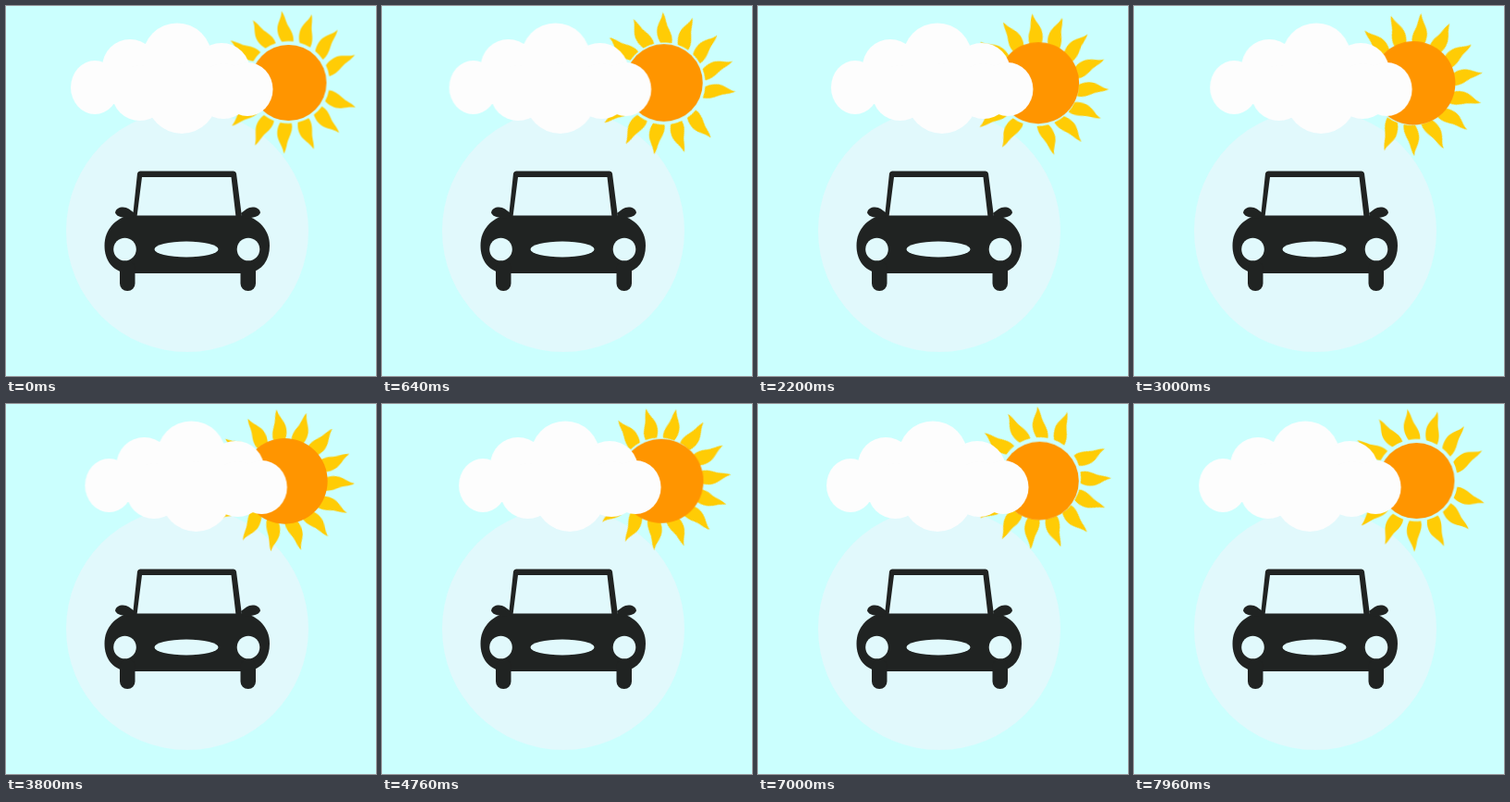
Animation of 400x400 px, one loop 8000 ms. Source, as an HTML page without scripts:

```html
<!DOCTYPE html>
<html lang="en">
<head>
<meta charset="utf-8">
<title>Car under a sunny sky</title>
<style>
  html, body { margin: 0; width: 100%; height: 100%; overflow: hidden; background: #cbfffe; }
  svg { display: block; width: 100%; height: 100%; }

  .cloud { fill: #fdfdfd; animation: drift 4s linear infinite alternate; }
  .disc { fill: #ff9500; animation: swell 4s linear infinite alternate; }
  .rays { fill: #ffcc05; animation: turn 8s linear infinite; }

  /* --i counts from the middle of the ring, --m flips the hook */
  .rays use {
    transform: rotate(calc(181.2deg + 24.9deg * var(--i))) translate(44px, 0)
      skewY(calc(-5deg - 1.2deg * var(--i))) scale(1, var(--m));
  }
  .left { --m: -1; }
  .right { --m: 1; }

  .pale { fill: #e1f9fc; }
  .car { fill: #202322; }

  @keyframes drift { to { transform: translateX(16.2px); } }
  @keyframes swell {
    from { transform: translate(305.5px, 83px) scale(41); }
    to { transform: translate(301.1px, 83.4px) scale(46.6); }
  }
  @keyframes turn {
    from { transform: translate(302.5px, 82.5px) rotate(0deg); }
    to { transform: translate(302.5px, 82.5px) rotate(360deg); }
  }
</style>
</head>
<body>
<svg viewBox="0 0 400 400">
  <defs>
    <path id="ray" d="M0-6C6-9 13-9.500 19-6.500S27-1.500 33.300 0C27 3 22 2 16 4.500S5 8 0 6.500Q1 0 0-6Z"/>
    <g id="side">
      <path d="M118 223.500C119 217 128 216 133 219.500L139 224 137 229C130 229.500 120 229 118 223.500Z"/>
      <rect x="123" y="276" width="16.500" height="32" rx="8"/>
    </g>
  </defs>

  <circle class="pale" cx="196" cy="243" r="131"/>

  <g class="rays">
    <g transform="translate(3 0)">
      <g class="left">
        <use href="#ray" style="--i:-6.5"/>
        <use href="#ray" style="--i:-5.5"/>
        <use href="#ray" style="--i:-4.5"/>
        <use href="#ray" style="--i:-3.5"/>
        <use href="#ray" style="--i:-2.5"/>
        <use href="#ray" style="--i:-1.5"/>
        <use href="#ray" style="--i:-.5"/>
      </g>
      <g class="right">
        <use href="#ray" style="--i:.5"/>
        <use href="#ray" style="--i:1.5"/>
        <use href="#ray" style="--i:2.5"/>
        <use href="#ray" style="--i:3.5"/>
        <use href="#ray" style="--i:4.5"/>
        <use href="#ray" style="--i:5.5"/>
        <use href="#ray" style="--i:6.5"/>
      </g>
    </g>
  </g>
  <circle class="disc" r="1"/>

  <g class="cloud">
    <ellipse cx="96" cy="88" rx="26" ry="29"/>
    <circle cx="134" cy="66" r="30"/>
    <circle cx="144.500" cy="94" r="30"/>
    <circle cx="185" cy="56" r="37.500"/>
    <circle cx="190" cy="100" r="38"/>
    <circle cx="233" cy="71" r="31"/>
    <circle cx="235" cy="92" r="30"/>
    <ellipse cx="261" cy="90" rx="27.500" ry="29"/>
    <rect x="100" y="66" width="160" height="40"/>
  </g>

  <g class="car">
    <path fill-rule="evenodd" d="M145 178.500H246Q248.500 178.500 249 181L255 228H137L142 181Q142.500 178.500 145 178.500ZM147 185L141.500 228H248.500L243.500 185Z"/>
    <path d="M132 226.500H259C272 230 285 241 285 259C285 275 277 286 262 289H130C115 286 106.500 275 106.500 259C106.500 241 119 230 132 226.500Z"/>
    <use href="#side"/>
    <use href="#side" transform="translate(393 0) scale(-1 1)"/>
  </g>
  <g class="pale">
    <circle cx="128.500" cy="263" r="12.300"/>
    <circle cx="262" cy="263" r="12.300"/>
    <ellipse cx="195" cy="263" rx="34.500" ry="8.400"/>
  </g>
</svg>
</body>
</html>
```
